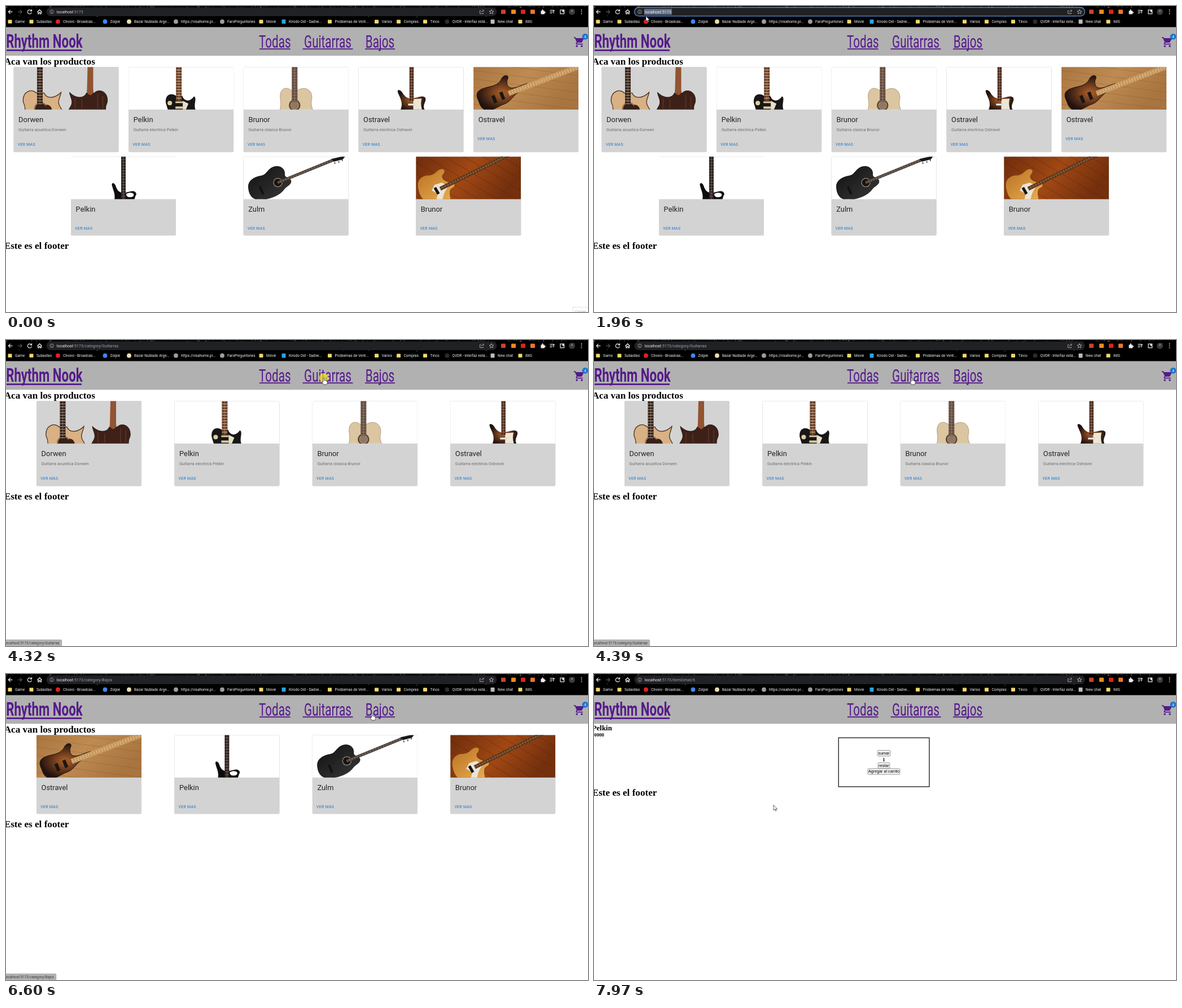
Animation of 1031x543 px, one loop 8000 ms. Source, as an HTML page:

```html
<!DOCTYPE html>
<html lang="es">
<head>
<meta charset="utf-8">
<title>Rhythm Nook</title>
<style>
html, body { margin: 0; width: 100%; height: 100%; overflow: hidden; background: #fff; }
svg { display: block; }
#stage { width: 100vw; height: 100vh; font-family: Roboto, sans-serif; }
.serif { font-family: "Liberation Serif", serif; font-weight: 700; }
.h1 { font-size: 17.15px; }
.h2 { font-size: 12.9px; }
.h4 { font-size: 8.6px; }
.brand { font-size: 34px; font-weight: 700; }
.link { font-size: 31.5px; text-anchor: middle; }
.mark { font-size: 6.5px; fill: #f1f1f1; }
.url { font-size: 7.15px; }
.name { font-size: 12.9px; fill: #212121; }
.desc { font-size: 7.52px; fill: #6d6d6d; }
.more { font-size: 6.98px; letter-spacing: .27px; fill: #1976d2; }
.card { filter: drop-shadow(0 .8px .5px #0003); }
.btn { font: 7.16px "Liberation Sans", sans-serif; text-anchor: middle; }
.mid { text-anchor: middle; }
.tip { font-size: 6.3px; fill: #3c3c3c; }
</style>
</head>
<body>
<svg id="stage" viewBox="0 0 1031 543" preserveAspectRatio="none">
  <defs>
    <radialGradient id="burst"><stop offset=".15" stop-color="#9a5626"/><stop offset=".6" stop-color="#5a3019"/><stop offset="1" stop-color="#20130f"/></radialGradient>
    <linearGradient id="oak" x2="1" y2=".4"><stop stop-color="#a9753f"/><stop offset=".5" stop-color="#bf8b53"/><stop offset="1" stop-color="#a8743f"/></linearGradient>
    <linearGradient id="cherry" x2="1" y2=".3"><stop stop-color="#6f2c0c"/><stop offset=".55" stop-color="#a04814"/><stop offset="1" stop-color="#74300d"/></linearGradient>
    <linearGradient id="amber" x2="1" y2="1"><stop stop-color="#b97020"/><stop offset="1" stop-color="#eab057"/></linearGradient>
    <linearGradient id="ebony" x2="1" y2="1"><stop stop-color="#111"/><stop offset="1" stop-color="#383838"/></linearGradient>
  </defs>
  <g id="page"></g>
  <g id="header"></g>
  <g id="chrome"></g>
  <g id="overlay">
    <g id="tip"><rect id="tipBox" x="-3" y="532" height="12" rx="1.5" fill="#b3b3b3" stroke="#8d8d8d" stroke-width=".6"/><text id="tipText" class="tip" x="-1.8" y="540"/></g>
    <g id="snip"><rect x="1004.5" y="534.5" width="30" height="12" fill="#fff" stroke="#e2e2e2"/><text x="1008" y="544.5" font-size="6.5" fill="#aaa">Copias</text></g>
    <g id="pointer">
      <circle id="glow" r="8.3" fill="#f2e21c" opacity=".7"/>
      <path id="arrow" d="M0 0V9.2L2.2 7.3 3.7 10.6 5.2 9.9 3.7 6.8H6.6Z" fill="#fff" stroke="#222" stroke-width=".7"/>
      <path id="hand" d="M-1.1.6Q0-.9 1.1.6V4.6Q2.6 3.8 3.2 5.1 4.6 4.6 4.9 6 6.2 5.8 6.2 7.2V9.4L5 12H-.4L-3.2 8Q-3.9 6-1.1 7.2Z" fill="#fff" stroke="#222" stroke-width=".7"/>
      <path id="beam" d="M-1.5-5H1.5M0-5V5M-1.5 5H1.5" stroke="#ddd" stroke-width=".8"/>
    </g>
  </g>
</svg>
<script>
const $ = id => document.getElementById(id);
const LOOP = 8000;
const PURPLE = '#551a8b';

const rect = (x, y, w, h, fill, more = '') => `<rect x="${x}" y="${y}" width="${w}" height="${h}" fill="${fill}" ${more}/>`;
const disc = (x, y, r, fill, more = '') => `<circle cx="${x}" cy="${y}" r="${r}" fill="${fill}" ${more}/>`;
const path = (d, fill, more = '') => `<path d="${d}" fill="${fill}" ${more}/>`;
const line = (d, color, w, more = '') => path(d, 'none', `stroke="${color}" stroke-width="${w}" ${more}`);
const text = (x, y, cls, s, more = '') => `<text x="${x}" y="${y}" class="${cls}" ${more}>${s}</text>`;

// Neck with frets and a shine of strings
const neck = (d, w, wood, fret = '#cdbfa8') =>
  line(d, wood, w) + line(d, fret, w * .9, 'stroke-dasharray=".6 4.4"') + line(d, '#e8e0d0', .5, 'opacity=".6"');

function planks(fill, seam, gap, dy) {
  let s = rect(0, 0, 186, 76, fill);
  for (let y = -dy; y < 80; y += gap) s += line(`M0 ${y}L186 ${y + dy}`, seam, .8, 'opacity=".5"');
  return s;
}

const ACOUSTIC = 'M17 62C15 42 33 38 40 46H54C58 56 72 57 84 45C83 53 77 60 81 68L86 77H20Q21 70 17 62Z';
const art = {
  acoustic: () =>
    path(ACOUSTIC, '#d8b184', 'stroke="#4c301d" stroke-width="1.3"') +
    disc(48, 74, 11, '#33211a', 'stroke="#a57e50" stroke-width="2"') + path('M57 67Q66 66 68 76H57Z', '#3a2018') +
    neck('M46.5 0V66', 10, '#38251d') +
    `<g transform="matrix(-1 0 0 1 183 0)">${path(ACOUSTIC, '#3d2119', 'stroke="#24130e" stroke-width="1"')}
    ${line('M25 52V76M34 48V76M62 58V76M74 56V76', '#5b3526', 1.5)}${path('M42 0H52L53 40Q55 47 47 50 40 47 42 40Z', '#925431')}</g>`,
  single: () => rect(0, 0, 186, 76, '#fff') +
    path('M66 64C64 48 76 45 84 51H95C99 62 109 62 116 52C122 56 114 66 119 77H70Z', '#191716') +
    path('M96 60L106 65 101 77H96Z', '#e8dfc8') + disc(73, 64, 4, '#dfcda0') +
    rect(83, 61, 13, 3, '#d8c8a0') + rect(83, 70, 13, 4, '#d8c8a0') +
    neck('M89 0V60', 10, '#6d4028', '#eee4cc'),
  classic: () => rect(0, 0, 186, 76, '#fff') +
    path('M65 54C64 38 75 34 84 41H96C108 34 122 39 121 56 119 66 120 68 123 77H64C67 69 66 63 65 54Z', '#dbc6a1', 'stroke="#a18a66" stroke-width=".8"') +
    disc(90.5, 68, 9, '#b58f65', 'stroke="#5b4630" stroke-width="2.6"') + disc(90.5, 68, 6.6, '#8c7868') +
    neck('M90.5 0V62', 10, '#664d40', '#917966'),
  sunburst: () => rect(0, 0, 186, 76, '#fff') +
    path('M70 46C67 38 75 39 80 49 86 56 90 56 98 55 107 54 113 50 118 54 122 61 111 67 118 77H74C80 64 74 56 70 46Z', 'url(#burst)') +
    path('M97 57L112 56Q109 65 113 77H97Z', '#ece6d6') + rect(88, 65, 11, 3, '#eee', 'stroke="#aaa" stroke-width=".4"') +
    neck('M94 0V60', 7.5, '#4f2c20', '#a08670'),
  oakBass: () => planks('url(#oak)', '#875a2d', 15, 24) +
    path('M9 60C2 46 8 40 24 36 38 33 46 30 50 20 54 13 63 14 61 20 57 28 60 36 66 37 76 38 84 32 96 29 97 35 88 39 82 43 70 50 66 62 54 66 42 70 36 78 24 77 14 75 12 68 9 60Z', 'url(#burst)', 'stroke="#20130d" stroke-width="1"') +
    rect(34, 50, 6, 14, '#1c1512', 'transform="rotate(-22 37 57)"') + rect(48, 44, 6, 14, '#1c1512', 'transform="rotate(-22 51 51)"') +
    neck('M62 47L190 -2', 9, '#d2a468', '#8e683e'),
  blackBass: () => rect(0, 0, 186, 76, '#fff') +
    path('M73 52C71 46 76 45 79 51 82 61 86 65 96 64 107 62 111 59 115 64 118 70 111 70 116 65L112 77H77C79 65 75 61 73 52Z', '#0c0c0c') +
    path('M98 66Q106 62 111 66 113 72 104 72 98 72 98 66Z', '#fff') +
    neck('M93 0V76', 8, '#2b211f', '#766a66'),
  blackAcoustic: () => rect(0, 0, 186, 76, '#fff') +
    path('M9 56C7 42 20 36 32 34 42 32 42 22 54 18 66 15 74 22 73 32 73 38 80 36 84 42 86 50 76 52 72 58 64 70 40 78 24 76 14 74 10 66 9 56Z', 'url(#ebony)', 'stroke="#080808" stroke-width=".8"') +
    disc(61, 46, 8.3, '#8a7a70') + disc(61, 46, 6.8, '#171310') + line('M29 53L35 67', '#15100e', 4) +
    neck('M61 46L159 6', 5.2, '#453932', '#93877c') + path('M156 4L174 0H180L176 5 160 9Z', '#171717') +
    line('M162 10V13M169 8V11M175 5V8', '#222', 1.4),
  amberBass: () => planks('url(#cherry)', '#4e1c08', 20, 110) +
    path('M3 52C2 40 12 33 22 33 34 33 36 24 44 22 53 21 52 28 47 33 45 40 52 43 58 45 68 47 72 50 66 55 58 58 60 66 62 77H14C6 70 4 60 3 52Z', 'url(#amber)', 'stroke="#7a430f" stroke-width=".8"') +
    path('M33 50L46 46 58 53Q50 60 47 77H36L39 66 28 60Z', '#eae4d8') + rect(31, 58, 13, 5, '#181412', 'transform="rotate(60 37 60)"') +
    neck('M43 57L164 -3', 7, '#5d3419', '#a5764a'),
};

const guitars = [
  ['Dorwen', 'acoustic', 'Guitarra acustica Dorwen'],
  ['Pelkin', 'single', 'Guitarra electrica Pelkin'],
  ['Brunor', 'classic', 'Guitarra clasica Brunor'],
  ['Ostravel', 'sunburst', 'Guitarra electrica Ostravel'],
];
const basses = [
  ['Ostravel', 'oakBass'], ['Pelkin', 'blackBass'], ['Zulm', 'blackAcoustic'], ['Brunor', 'amberBass'],
];

function card([name, pic, desc], x, y, h) {
  return `<g transform="translate(${x} ${y})"><g class="card">${rect(0, 0, 186, h, '#d3d3d3', 'rx="2"')}</g>
    <svg width="186" height="75.4">${art[pic]()}</svg>
    ${text(8.6, 97.3, 'name', name)}${desc ? text(8.6, 113.3, 'desc', desc) : ''}
    ${text(7.2, desc ? 140 : 129.3, 'more', 'VER MAS')}</g>`;
}
const row = (items, x, gap, y, h) => items.map((it, i) => card(it, x + i * gap, y, h)).join('');
const heading = text(-3.3, 104, 'serif h1', 'Aca van los productos');
const footer = y => text(-3.3, y, 'serif h1', 'Este es el footer');
const button = (y, w, s) =>
  rect(513.5 - w / 2, y, w, 10.4, '#efefef', 'rx="1.6" stroke="#767676" stroke-width=".7"') + text(513.5, y + 7.6, 'btn', s);

const pages = {
  all: heading + row([...guitars, basses[0]], 13.5, 203.65, 108.3, 151) + row(basses.slice(1), 115, 305.6, 267.3, 140) + footer(431),
  guitars: heading + row(guitars, 54, 244.4, 108.3, 151) + footer(283),
  basses: heading + row(basses, 54, 244.4, 108.3, 140) + `<g id="hover">${rect(301, 227, 40, 16, '#1976d2', 'opacity=".06" rx="2"')}</g>` + footer(272),
  detail: text(-3.3, 100, 'serif h2', 'Pelkin') + text(-3.7, 110.6, 'serif h4', '10000') +
    rect(433.2, 113.2, 160.8, 86.8, 'none', 'stroke="#111" stroke-width="1.3"') +
    button(135.4, 22.6, 'sumar') + text(513.5, 155, 'serif h4 mid', '1') +
    button(157.2, 20.6, 'restar') + button(167.8, 57, 'Agregar al carrito') + footer(216),
};
$('page').innerHTML = Object.entries(pages).map(([k, s]) => `<g id="p-${k}">${s}</g>`).join('');

// Site header; the display face is narrow, so all of it shares one condensed setting
const narrow = (x, s, cls) => `<g transform="translate(${x} 0) scale(.655 1)">${text(0, 74.5, cls, s)}</g>`;
const link = (id, s, x1, x2) =>
  `<g id="${id}" fill="${PURPLE}">${narrow((x1 + x2) / 2, s, 'link')}<rect x="${x1}" y="75.3" width="${x2 - x1}" height="1.9"/></g>`;
$('header').innerHTML = rect(0, 37, 1031, 51.3, '#b1b1b1') +
  `<g fill="${PURPLE}">${narrow(.2, 'Rhythm Nook', 'brand')}<rect x="1" y="77.2" width="133" height="2.8"/></g>` +
  link('l-all', 'Todas', 449, 503.5) + link('l-guitars', 'Guitarras', 525.5, 614.5) + link('l-basses', 'Bajos', 636, 689) +
  `<g transform="translate(1005 53.6) scale(.88)">${path('M7 18c-1.1 0-1.99.9-1.99 2S5.9 22 7 22s2-.9 2-2-.9-2-2-2zM1 2v2h2l3.6 7.59-1.35 2.45c-.16.28-.25.61-.25.96 0 1.1.9 2 2 2h12v-2H7.42c-.14 0-.25-.11-.25-.25l.03-.12.9-1.63h7.45c.75 0 1.41-.41 1.75-1.03l3.58-6.49c.08-.14.12-.31.12-.48 0-.55-.45-1-1-1H5.21l-.94-2H1zm16 16c-1.1 0-1.99.9-1.99 2s.89 2 1.99 2 2-.9 2-2-.9-2-2-2z', PURPLE)}</g>` +
  disc(1026, 54.3, 5.4, '#1976d2') + text(1026, 56.7, 'mid', '4', 'font-size="6.5" fill="#fff"');

// Browser bars
let seed = 7;
const rand = () => (seed = seed * 16807 % 2147483647) / 2147483647;
const stars = Array.from({ length: 220 }, (_, i) =>
  disc((rand() * 1031).toFixed(1), (rand() * (i < 170 ? 2.5 : 20)).toFixed(1), (.25 + rand() * .4).toFixed(2), '#aaa')).join('');
const FOLDER = '#f5d66d';
const marks = [
  [7, 'Game', FOLDER], [45, 'Subastas', FOLDER], [92, 'Clivoro - Broadcas...', '#e02020', 1], [175.5, 'Zolpie', '#4285f4', 1],
  [218, 'Bazar Nublado Arge...', '#e9dfb0', 1], [301, 'https://visahome.pr...', '#9a9ea3', 1], [383, 'FaroPreguntones', '#9a9ea3', 1],
  [452, 'Movie', FOLDER], [492, 'Kirodo Ost - Sadne...', '#2aa3e0', 2], [573.5, 'Problemas de Vent...', FOLDER],
  [656.5, 'Varios', FOLDER], [695.5, 'Compras', FOLDER], [742.5, 'Tinco', FOLDER], [781.5, 'QVDR - Interfaz está...', '#2b2b2b', 1],
  [862, 'New chat', '#b9bcc0', 2], [911, 'IMG', FOLDER],
];
const icon = (x, c, kind) => kind === 1 ? disc(x, 27.7, 3.9, c) : rect(x - 3.5, kind ? 24 : 24.6, 7, kind ? 7.4 : 6.4, c, 'rx=".8"');
const extensions = [[881, '#c8442a'], [899, '#f08a24'], [916, '#d8261c'], [933, '#e8772e']];
const white = d => line(d, '#eee', 1.2);
$('chrome').innerHTML = rect(0, 0, 1031, 37.5, '#000') + stars +
  white('M11.5 10.3H4.5M7.8 6.8L4.3 10.3 7.8 13.8') +
  line('M21 10.3H28M24.7 6.8L28.2 10.3 24.7 13.8', '#555', 1.2) +
  white('M44.8 8.2A3.6 3.6 0 1 0 45.4 11.4M45.5 6V9H42.5') +
  white('M55.5 10.5L59.5 6.7 63.5 10.5M56.7 9.8V14H58.5V11.3H60.6V14H62.4V9.8') +
  rect(71.5, 2.5, 798, 15.4, '#202124', 'id="bar" rx="7.7" stroke-width="1.3"') +
  line('M81 9.7V12.4M81 7.6V8.6', '#bbb', .8) + disc(81, 10.2, 3.3, 'none', 'stroke="#bbb" stroke-width=".7"') +
  `<g id="mark">${rect(89, 5, 49, 10.6, '#5d6c88')}</g>` +
  `<text class="url" x="89.8" y="13" fill="#f2f2f2">localhost<tspan id="route"></tspan></text>` +
  line('M841.5 8.2H839.5V13.6H845.5V12M842 11.4Q842.5 8.4 846.5 8.2M844.5 6.2L846.6 8.2 844.5 10.2', '#bbb', .8) +
  path('M860 6.4L861.1 9 864 9.2 861.8 11 862.5 13.8 860 12.3 857.5 13.8 858.2 11 856 9.2 858.9 9Z', 'none', 'stroke="#ccc" stroke-width=".8"') +
  extensions.map(([x, c]) => rect(x - 4, 6.6, 8, 7.4, c, 'rx="1"')).join('') +
  path('M947.5 8.4H949.5Q949 6 950.6 6T951.7 8.4H954V10.4Q956 10 956 11.4T954 12.4V14.4H947.5Z', '#eee') +
  white('M963.5 7.5H971M963.5 10H968.5M963.5 12.5H967M970 13V8.5H972') +
  rect(982, 7, 6.6, 6.8, 'none', 'stroke="#eee" stroke-width="1.2"') + rect(985.5, 7, 3, 3.5, '#eee') +
  disc(1002.5, 10.3, 5.5, '#3c3a3c') + disc(1002.5, 8.8, 1.9, '#77706e') +
  [7, 10.3, 13.6].map(y => disc(1019.5, y, .9, '#eee')).join('') +
  marks.map(([x, s, c, kind]) => icon(x, c, kind) + text(x + 9, 30, 'mark', s)).join('');

// Timeline: [start, value] lists hold until the next entry
const page = [[0, 'all'], [4320, 'guitars'], [6010, 'basses'], [7500, 'detail']];
const route = [[0, ''], [4320, '/category/Guitarras'], [6010, '/category/Bajos'], [7500, '/itemDetail/6']];
const tip = [[0, null], [2980, ''], [3920, '/category/Guitarras'], [5660, '/category/Bajos'], [6740, null], [7220, '/itemDetail/6'], [7840, null]];
const shape = [[0, ''], [300, 'arrow'], [1000, 'beam'], [1820, 'arrow'], [2980, 'hand'], [3720, 'arrow'], [3790, 'hand'],
  [5480, 'arrow'], [5620, 'hand'], [6670, 'arrow'], [7150, 'hand'], [7770, 'arrow']];
const glow = [[0, 0], [1430, 1], [1570, 0], [3110, 1], [3320, 0], [4250, 1], [4390, 0], [5860, 1], [6010, 0], [7420, 1], [7500, 0]];
const pressed = [[0, ''], [3110, 'l-all'], [3180, ''], [4250, 'l-guitars'], [4320, ''], [5860, 'l-basses'], [6010, '']];
const bar = [[0, 'idle'], [930, 'hover'], [1500, 'focus'], [3110, 'idle']];

// Pointer moves: first step, last step, step count, destination
const moves = [
  [300, 1080, 12, 260, 11], [1150, 1890, 11, 92, 18], [2030, 2710, 10, 455, 118], [2770, 3050, 5, 475, 64.3],
  [3580, 4050, 7, 563, 67], [5250, 5790, 8, 658, 65.3], [6600, 7220, 10, 318, 236], [7770, 7970, 4, 318, 232.5],
];

const pick = (list, t) => list.reduce((v, [at, x]) => at <= t ? x : v, list[0][1]);
const show = (id, on) => { $(id).style.display = on ? '' : 'none'; };

function pointerAt(t) {
  let x = 430, y = 490;
  for (const [a, b, n, tx, ty] of moves) {
    if (t < a) break;
    const p = Math.min(1, (Math.floor((t - a) / (b - a) * (n - 1) + 1e-6) + 1) / n);
    const e = p * p * (3 - 2 * p);
    x += (tx - x) * e;
    y += (ty - y) * e;
  }
  return [x, y];
}

function draw(t) {
  const now = pick(page, t), kind = pick(shape, t), mode = pick(bar, t), hint = pick(tip, t), red = pick(pressed, t);
  for (const k in pages) show('p-' + k, k === now);
  for (const id of ['l-all', 'l-guitars', 'l-basses']) $(id).setAttribute('fill', id === red ? '#f00' : PURPLE);
  for (const k of ['arrow', 'hand', 'beam']) show(k, k === kind);
  show('snip', t < 70);
  show('glow', pick(glow, t));
  show('hover', t >= 7150);
  show('mark', mode === 'focus');
  $('bar').setAttribute('fill', mode === 'hover' ? '#2c2d31' : '#202124');
  $('bar').setAttribute('stroke', mode === 'focus' ? '#5b8fd8' : 'none');
  $('route').textContent = ':5173' + pick(route, t);
  $('route').setAttribute('fill', mode === 'focus' ? '#f2f2f2' : '#9aa0a6');
  show('tip', hint !== null);
  if (hint !== null) {
    $('tipText').textContent = 'localhost:5173' + hint;
    $('tipBox').setAttribute('width', $('tipText').getComputedTextLength() + 5);
  }
  const [x, y] = pointerAt(t);
  $('pointer').setAttribute('transform', `translate(${x} ${y})`);
}

const start = performance.now();
function tick() {
  draw((performance.now() - start) % LOOP);
  requestAnimationFrame(tick);
}
tick();
</script>
</body>
</html>
```
